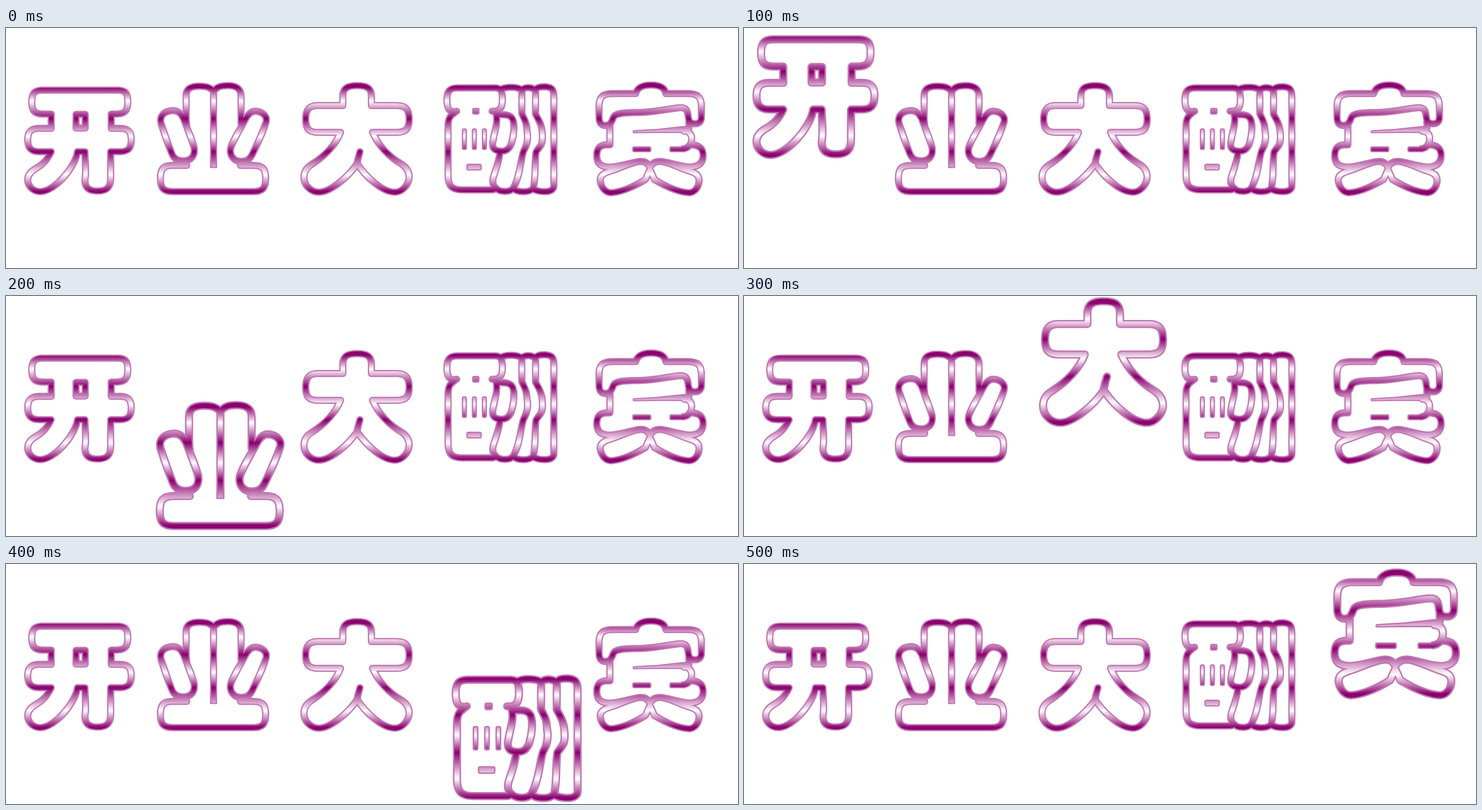
Write an HTML page with a canvas that moves like this. It is 1280 by 421 pixels and loops after 0.6 s.

```html
<!DOCTYPE html>
<html lang="zh">
<head>
<meta charset="utf-8">
<title>开业大酬宾</title>
<style>
  html, body { margin: 0; width: 100%; height: 100%; overflow: hidden; background: #fff; }
  canvas { display: block; }
</style>
</head>
<body>
<canvas id="stage" width="1280" height="421" role="img" aria-label="开业大酬宾"></canvas>
<script>
const ctx = document.getElementById('stage').getContext('2d');
const STEP = 100;
const SCALE = 1.14;
const BAND = 12.5;
const RIM = 2.3;
const EDGE = '#c277b5';
const DARK = '#8a006e';

// Vertical shine shared by all glyphs: dark and white alternate down the page.
const shine = ctx.createLinearGradient(0, 104, 0, 287);
[104, 128, 159, 190, 217, 257, 287].forEach((y, i) =>
  shine.addColorStop((y - 104) / 183, i % 2 ? '#fff' : DARK));

// rest / jump: top-left corner of the glyph at rest and while enlarged.
// bands: centre lines; stems: bands with square ends; slits: x, y, w, h.
const glyphs = [
  {
    rest: [32, 103], jump: [15, 13],
    bands: [
      `M79 151H66C50 151 45 146 45 130C45 114 50 109 64 109H195C209 109 213 114 213 130
       C213 146 207 151 192 151H184V176H200C214 176 219 182 219 196C219 211 214 217 199 217
       H183V264C183 280 176 286 160 286C145 286 138 280 138 267C141 250 138 235 138 217H125
       C122 242 86 287 60 287C48 287 38 278 38 266C38 257 44 251 53 246C65 239 72 231 79 217
       H58C44 217 38 211 38 196C38 181 44 176 58 176H79Z`,
      'M122.5 151.5H138.5V175.5H122.5Z'
    ]
  },
  {
    rest: [264, 95], jump: [262, 184.5],
    bands: [
      'M316 170C315 165 315 160 315 152V118C315 106 324 102 338 102C352 102 358 105 363 111',
      'M363 111C368 104 374 101 388 101C403 101 411 107 411 119V152C411 160 411 164 411 168',
      `M290 145C277 146 268 154 271 167C276 182 281 198 288 215C292 228 298 233 310 233
       C324 233 331 224 329 210C326 198 317 176 311 160C306 149 300 144 290 145Z`,
      `M437 146C449 147 457 155 455 164C450 182 440 202 432 219C427 230 422 234 411 234
       C398 234 390 223 393 210C397 197 408 180 417 163C423 151 429 145 437 146Z`,
      `M316 241H292C275 241 270 247 270 264C270 281 275 287 292 287H432
       C449 287 454 281 454 264C454 247 449 241 432 241H410`
    ],
    stems: ['M363 111V239.5']
  },
  {
    rest: [514, 94], jump: [515, 1.2],
    bands: [
      `M589 136V120C589 106 596 101 614 101C632 101 639 106 639 120V136H683
       C700 136 705 144 705 160C705 176 700 183 683 183H641C652 208 672 227 692 239
       C701 245 705 253 705 262C704 276 692 288 680 288C658 288 630 262 614 238
       C598 262 567 288 547 288C534 288 521 277 521 262C521 252 525 245 535 239
       C555 226 575 208 585 183H545C529 183 524 176 524 160C524 144 529 136 545 136Z`,
      'M614 238C615 229 617 224 619 217'
    ]
  },
  {
    rest: [765, 98], jump: [779.5, 195],
    bands: [
      'M788 146C775 150 771 140 771 126C771 110 776 105 790 105H855C867 105 868 113 868 126C868 141 863 147 850 146',
      `M784 149C776 154 773 160 773 172V258C773 278 780 284 798 284H846C852 284 854 284 857 281
       C863 288 881 289 887 281C893 289 915 289 921 282C931 288 958 291 958 277V120
       C958 106 953 104 943 103C933 103 929 104 925 109C919 103 907 103 902 109
       C896 103 874 102 865 108`,
      'M902 109V150C904 157 911 163 911 180C914 195 911 206 905 216C900 230 899 260 887 281',
      'M926 109V151C930 160 938 168 938 190C939 206 932 209 927 217C924 232 927 260 922 281',
      `M857 151C862 154 880 148 886 160C890 170 888 188 884 202C880 213 874 217 864 216
       C852 215 849 209 852 196C854 182 861 165 857 151Z`,
      'M864 217C862 235 857 247 852 262C850 271 852 278 857 281'
    ],
    slits: [
      [797, 176, 9, 38], [814.5, 176, 9, 38], [832, 176, 9, 38],
      [805, 238, 27, 12], [815, 140, 13, 12]
    ]
  },
  {
    rest: [1027, 94], jump: [1026, 8],
    bands: [
      `M1101 115C1104 105 1112 100 1128 100C1144 100 1152 105 1154 115H1192
       C1210 115 1216 121 1216 138V156C1216 164 1212 168 1205 168C1197 168 1194 164 1193 156
       C1192 143 1188 139 1177 140C1155 142 1140 147 1112 148C1085 149 1066 148 1062 157
       C1058 168 1055 171 1048 171C1040 171 1037 165 1037 156V138C1037 121 1043 115 1061 115Z`,
      `M1056 169V205H1049C1037 206 1033 213 1033 224C1033 238 1041 244 1057 244
       C1078 243 1098 234 1111 234C1119 234 1123 238 1126 244
       C1130 237 1136 234 1143 234C1156 234 1176 243 1195 244
       C1212 244 1219 236 1219 224C1219 211 1212 206 1200 205`,
      'M1194 164C1194 170 1196 174 1193 178',
      'M1186 181C1195 181 1199 186 1199 194C1199 205 1192 211 1184 212',
      `M1126 248L1118 266C1100 277 1078 288 1057 289C1046 288 1040 277 1039 267
       C1039 256 1050 253 1060 250C1080 243 1098 234 1111 234`,
      `M1126 248L1134 266C1152 277 1174 288 1195 289C1206 288 1212 277 1212 267
       C1212 256 1202 253 1192 250C1172 243 1156 234 1143 234`
    ],
    slits: [[1095, 207.5, 33.5, 10.5], [1160, 207.5, 28, 10.5]],
    wedge: 'M1098 181.5L1140 179L1186 174H1195V182H1140L1098 182.5Z'
  }
];

for (const g of glyphs) {
  const join = list => new Path2D((list || []).join(' '));
  g.bandPath = join(g.bands);
  g.stemPath = join(g.stems);
  g.wedgePath = g.wedge && new Path2D(g.wedge);
}

function paint(g, style, inset) {
  ctx.strokeStyle = ctx.fillStyle = style;
  ctx.lineJoin = 'round';
  ctx.lineWidth = BAND - 2 * inset;
  ctx.lineCap = 'round';
  ctx.stroke(g.bandPath);
  ctx.lineCap = 'square';
  ctx.stroke(g.stemPath);
  for (const [x, y, w, h] of g.slits || []) {
    ctx.beginPath();
    ctx.roundRect(x + inset, y + inset, w - 2 * inset, h - 2 * inset, 3.5 - inset);
    ctx.fill();
  }
  if (g.wedgePath) {
    ctx.fill(g.wedgePath);
    ctx.lineWidth = 2 * RIM;
    if (!inset) ctx.stroke(g.wedgePath);
  }
}

function drawGlyph(g, jumping) {
  ctx.save();
  if (jumping) {
    ctx.translate(...g.jump);
    ctx.scale(SCALE, SCALE);
    ctx.translate(-g.rest[0], -g.rest[1]);
  }
  paint(g, EDGE, 0);
  paint(g, shine, RIM);
  ctx.restore();
}

function draw(time) {
  // One quiet step, then each glyph jumps for one step in turn.
  const active = Math.floor(time / STEP) % (glyphs.length + 1) - 1;
  ctx.fillStyle = '#fff';
  ctx.fillRect(0, 0, 1280, 421);
  glyphs.forEach((g, i) => drawGlyph(g, i === active));
}

const start = performance.now();
function tick() {
  draw(performance.now() - start);
  requestAnimationFrame(tick);
}
tick();
</script>
</body>
</html>
```
